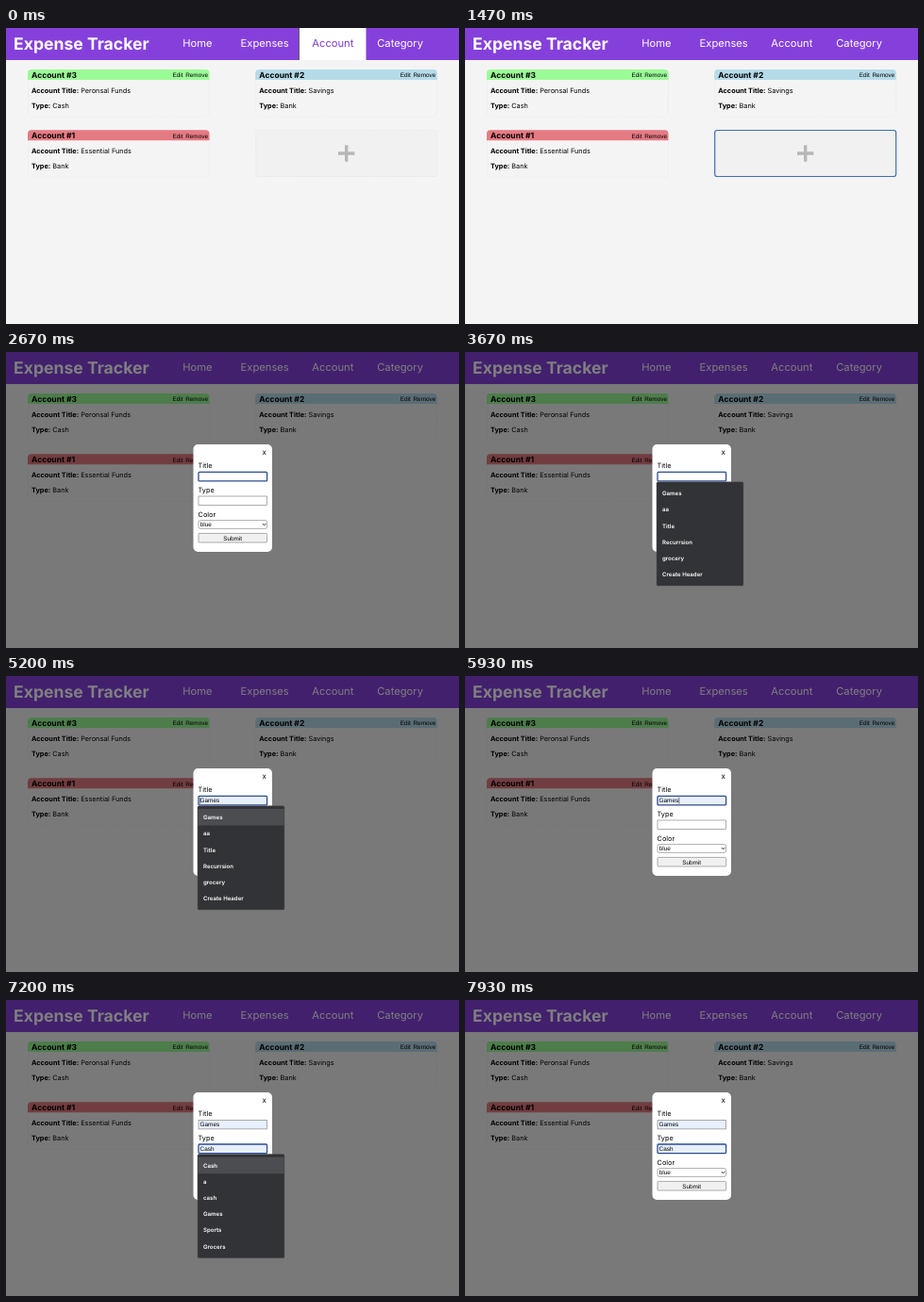
Recreate the animation shown at these times as an HTML page. Size 480 px wide and 314 px high, loop 8 s.

```html
<!DOCTYPE html>
<html lang="en">
<head>
<meta charset="utf-8">
<title>Expense Tracker</title>
<style>
  html, body { margin: 0; width: 100%; height: 100%; overflow: hidden; background: #f4f4f4; }
  svg { display: block; width: 480px; height: 314px; }
  text { font: 7.3px Inter, sans-serif; text-rendering: geometricPrecision; white-space: pre; }
  .brand { font-size: 17.6px; font-weight: 700; fill: #fff; }
  .nav { font-size: 11.2px; fill: #fff; }
  .head { font-size: 8.5px; font-weight: 700; }
  .b { font-weight: 700; }
  .ui { font: 6.4px "Liberation Sans", Arial, sans-serif; }
  .item { font-size: 6.1px; font-weight: 600; fill: #fff; }
</style>
</head>
<body>
<svg id="stage" viewBox="0 0 480 314"></svg>
<script>
const LOOP = 8000;
const TAB_BLUR = 1330, MODAL_OPEN = 1530;
const titleField = { y: 127, value: "Games", focus: 2670, list: 2730, hover: 4000, pick: 5800, blur: 6400,
  caret: 2720, items: ["Games", "aa", "Title", "Recurrsion", "grocery", "Create Header"] };
const typeField = { y: 152.7, value: "Cash", focus: 6400, list: 6460, hover: 6930, pick: 7330, blur: LOOP,
  caret: 6400, items: ["Cash", "a", "cash", "Games", "Sports", "Grocers"] };

const rect = (x, y, w, h, fill, extra = "") =>
  `<rect x="${x}" y="${y}" width="${w}" height="${h}" fill="${fill}" ${extra}/>`;
const text = (x, y, str, cls = "", extra = "") =>
  `<text x="${x}" y="${y}" class="${cls}" ${extra}>${str}</text>`;
const group = (id, body) => `<g id="${id}">${body}</g>`;

function card(x, y, name, color, title, type) {
  const row = (dy, label, value) => text(x + 4, y + dy, `<tspan class="b">${label}:</tspan> ${value}`);
  return rect(x + .5, y + .5, 192, 49.5, "none", 'rx="4" stroke="#e6e6e6" stroke-width=".6" stroke-dasharray="2 1"') +
    `<path d="M${x} ${y + 11}v-7q0-4 4-4h184.5q4 0 4 4v7z" fill="${color}"/>` +
    text(x + 4, y + 8.9, name, "head") +
    text(x + 153.5, y + 8.2, "Edit", "ui") + text(x + 167.2, y + 8.2, "Remove", "ui") +
    row(25, "Account Title", title) + row(40.8, "Type", type);
}

function field(id, f) {
  return rect(204, f.y + .3, 72.6, 9.6, "#fff", `id="${id}Box"`) +
    text(205.6, f.y + 7.2, f.value, "ui", `id="${id}Value"`) +
    rect(0, f.y + 1.8, .6, 6.6, "#111", `id="${id}Caret"`);
}

function dropdown(id, f) {
  const top = f.y + 10.8;
  return group(id + "List",
    rect(203, top, 92, 110.3, "#323336", 'rx="1.5" stroke="#55565a" stroke-width=".5"') +
    rect(203.3, top + 3.2, 91.4, 17.5, "#4b4d50", `id="${id}Hover"`) +
    f.items.map((s, i) => text(209, top + 14.5 + i * 17.12, s, "item")).join(""));
}

const nav = [["Home", 187.2], ["Expenses", 248.6], ["Account", 324.3], ["Category", 393.2]];

stage.innerHTML =
  rect(0, 0, 480, 314, "#f4f4f4") +
  rect(0, 0, 480, 34, "#8540dc") +
  text(8, 22.8, "Expense Tracker", "brand") +
  nav.map(([s, x]) => text(x, 19.6, s, "nav")).join("") +
  group("activeTab", rect(310, 0, 71.5, 34, "#fff") + rect(310, 0, .8, 34, "#333") +
    text(324.3, 19.6, "Account", "nav", 'style="fill:#7d3cc9"')) +
  card(23, 44, "Account #3", "#9bfc97", "Peronsal Funds", "Cash") +
  card(264.3, 44, "Account #2", "#b5dbe9", "Savings", "Bank") +
  card(23, 108.3, "Account #1", "#e67a82", "Essential Funds", "Bank") +
  group("addCard",
    rect(264.7, 108.5, 192, 49, "#f1f1f1", 'id="addBox" rx="2.5"') +
    '<path d="M352 133h17.4M360.7 124.3v17.4" stroke="#b7b7b7" stroke-width="3.4"/>') +
  group("modal",
    rect(0, 0, 480, 314, "#000", 'opacity=".5"') +
    rect(198.5, 98, 83.5, 114, "#fff", 'rx="5"') +
    text(271.5, 109.3, "x", "", 'style="font-size:8px"') +
    text(203.6, 123, "Title") + text(203.6, 148.8, "Type") + text(203.6, 174.5, "Color") +
    field("title", titleField) + field("type", typeField) +
    rect(204, 178.6, 72.6, 8.8, "#fff", 'rx="1.8" stroke="#777" stroke-width=".6"') +
    text(205.8, 185.3, "blue", "ui") +
    '<path d="M271.8 182l1.8 1.8 1.8-1.8" fill="none" stroke="#111" stroke-width=".9"/>' +
    rect(204, 192.4, 72.6, 9.6, "#f0f0f0", 'rx="1" stroke="#777" stroke-width=".6"') +
    text(240.2, 199.5, "Submit", "ui", 'text-anchor="middle"') +
    dropdown("title", titleField) + dropdown("type", typeField));

const el = id => document.getElementById(id);
const show = (id, on) => el(id).setAttribute("display", on ? "inline" : "none");
const set = (id, attrs) => { for (const k in attrs) el(id).setAttribute(k, attrs[k]); };

function updateField(id, f, t) {
  const focused = t >= f.focus && t < f.blur, filled = t >= f.hover, picked = t >= f.pick;
  set(id + "Box", {
    fill: filled ? "#e8f0fe" : "#fff",
    stroke: focused ? "#2b4c8f" : "#777",
    "stroke-width": focused ? 1.3 : .6,
    rx: focused ? 1 : 0
  });
  show(id + "Value", filled);
  show(id + "List", t >= f.list && !picked);
  show(id + "Hover", filled);
  const end = 206 + el(id + "Value").getComputedTextLength();
  set(id + "Caret", { x: picked ? end : 205.6 });
  show(id + "Caret", focused && (t - (picked ? f.pick : f.caret) + LOOP) % 1000 < 500);
}

function frame(now) {
  const t = now % LOOP;
  show("activeTab", t < TAB_BLUR);
  show("addCard", t < MODAL_OPEN);
  show("modal", t >= MODAL_OPEN);
  set("addBox", t < TAB_BLUR
    ? { stroke: "#e4e4e4", "stroke-width": .6, "stroke-dasharray": "2 1" }
    : { stroke: "#3f6db5", "stroke-width": 1.2, "stroke-dasharray": "none" });
  updateField("title", titleField, t);
  updateField("type", typeField, t);
  requestAnimationFrame(frame);
}
frame(performance.now());
</script>
</body>
</html>
```
